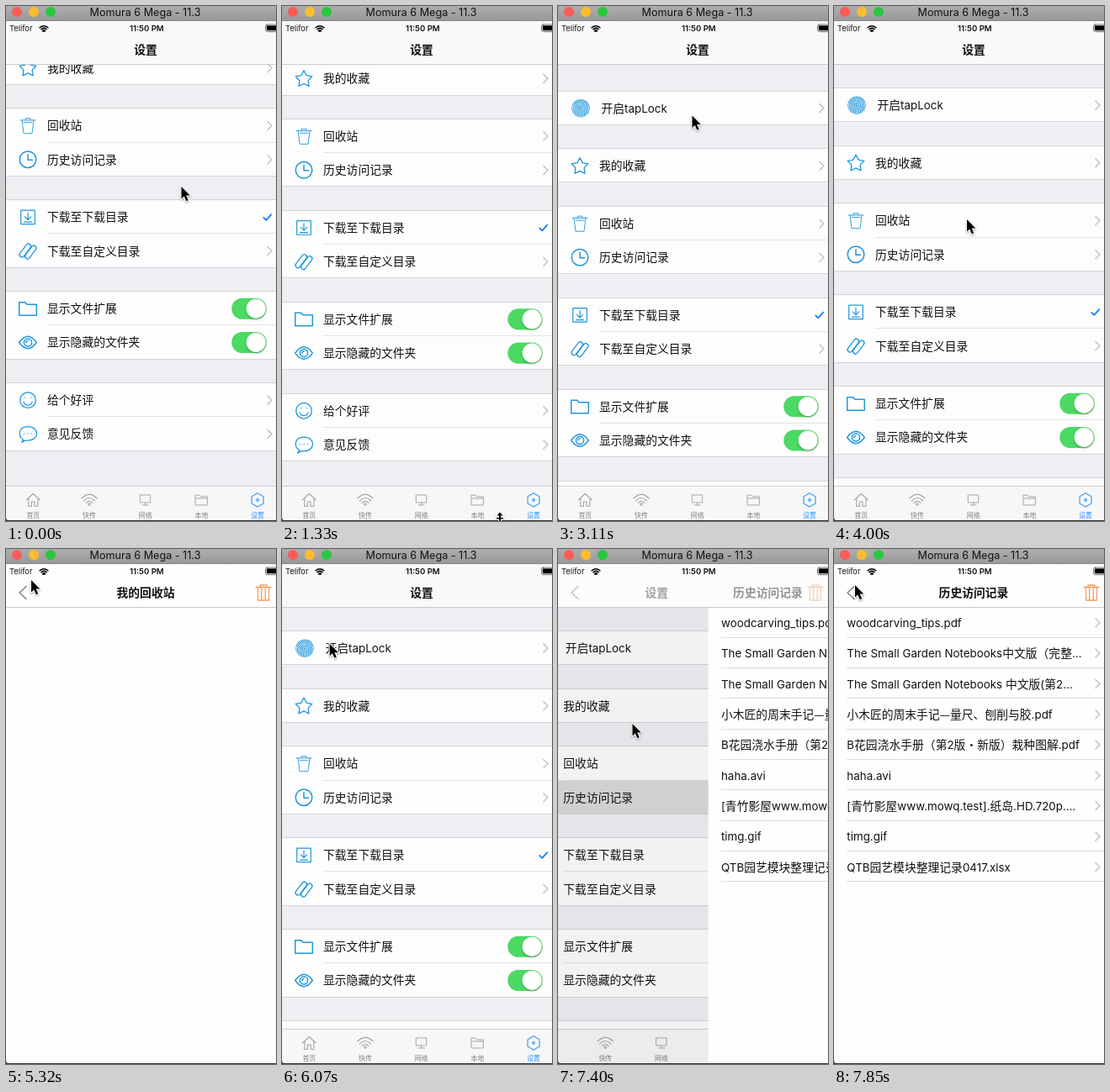
An HTML page with a canvas for the animation above (8000 ms loop, 321 by 613 pixels).

```html
<!DOCTYPE html>
<html lang="zh-CN">
<head>
<meta charset="utf-8">
<title>设置</title>
<style>
html, body { margin: 0; width: 100%; height: 100%; overflow: hidden; background: #fff; }
canvas { display: block; width: 321px; height: 613px; }
</style>
</head>
<body>
<canvas id="stage"></canvas>
<script>
const W = 321, H = 613, LOOP = 8000, STEP = LOOP / 54;
const MID = 166, NAV = 69, TAB = 572, TOP = 98, ROW = 40.25, GAP = 28.4;
const BLUE = '#1f97dc', LINE = '#e3e3e6', EDGE = '#d3d3d8';
const LATIN = 'Inter, "Liberation Sans", sans-serif';
const HAN = '"Noto Sans CJK SC", "Noto Sans CJK", sans-serif';

const canvas = document.getElementById('stage');
const ctx = canvas.getContext('2d');
const dpr = window.devicePixelRatio || 1;
canvas.width = W * dpr;
canvas.height = H * dpr;

const circle = (x, y, r) =>
  `M${x - r} ${y}a${r} ${r} 0 1 1 ${2 * r} 0a${r} ${r} 0 1 1 ${-2 * r} 0`;
const capsule = (ax, ay, bx, by, r) => {
  const len = Math.hypot(bx - ax, by - ay);
  const nx = (ay - by) / len * r, ny = (bx - ax) / len * r;
  const arc = `A${r} ${r} 0 0 0 `;
  return `M${ax + nx} ${ay + ny}L${bx + nx} ${by + ny}${arc}${bx - nx} ${by - ny}` +
    `L${ax - nx} ${ay - ny}${arc}${ax + nx} ${ay + ny}Z`;
};
const star = () => {
  let d = '';
  for (let i = 0; i < 10; i++) {
    const r = i % 2 ? 5.4 : 10.3, a = i * Math.PI / 5;
    d += (i ? 'L' : 'M') + r * Math.sin(a) + ' ' + (0.7 - r * Math.cos(a));
  }
  return d + 'Z';
};

// Each icon: path, line width
const ICONS = {
  star: [star(), 1.3],
  bin: ['M-9-6.5H9M-3-6.5V-8.7H3V-6.5M-7-6.5L-5 9.3H5L7-6.5M-5-3.8H5', 0.9],
  clock: [circle(0, 0, 9.8) + 'M0-6V.5H5.5', 1.5],
  down: ['M-8.3-8.3H8.3V8.3H-8.3ZM0-5V3M-3.7-.5L0 3.2L3.7-.5M-4.5 5.7H4.5', 1.2],
  link: [capsule(-7, 4.5, 0.5, -5.5, 2.9) + capsule(-0.5, 6.5, 7, -3.5, 2.9), 1.3],
  folder: ['M-10.3-7.6H-3.5L-1-5H10.3V8H-10.3Z', 1.5],
  eye: ['M-10.3 0Q0-14.5 10.3 0Q0 14.5-10.3 0Z' + circle(0, 0, 4.6) + 'M-2 0A2 2 0 0 1 0-2', 1.5],
  smile: [circle(0, 0, 9.3) + 'M-5 2.2A5.2 5.2 0 0 0 5 2.2M-3.4-3h.1M3.4-3h.1', 1.3],
  chat: ['M-5 7.2C-12 4-12-8.8 0-8.8C14-8.8 14 7.8 0 7.8L-2.5 7.8L-7.5 9.8Z' +
    'M-4.5-.3h.1M0-.3h.1M4.5-.3h.1', 1.3],
  home: ['M-8 0L0-7.5L8 0M-5.5-1.5V7.5H-1.8V2H1.8V7.5H5.5V-1.5', 1.1],
  waves: ['M-9.3-1.8Q0-11.5 9.3-1.8M-6.6 1Q0-6 6.6 1M-4 3.6Q0-.6 4 3.6' + circle(0, 5, 1.3), 1.1],
  screen: ['M-6-6H6V3H-6ZM-3.5 6H3.5M0 3V6', 1],
  files: ['M-7-6H-2.5L-1-4H7V6H-7ZM-7-2H7', 1],
  hex: ['M0-8.2L7-4.1V4.1L0 8.2L-7 4.1V-4.1Z' + circle(0, 0, 1.3), 1.2],
  trash: ['M-9-6.5H9M-4-6.5V-9H4V-6.5M-6.5-6.5V9H6.5V-6.5M-2.3-5V7.5M2.3-5V7.5', 1.3],
};
for (const k in ICONS) ICONS[k][0] = new Path2D(ICONS[k][0]);

const SECTIONS = [
  [['finger', '开启tapLock', 'more']],
  [['star', '我的收藏', 'more']],
  [['bin', '回收站', 'more'], ['clock', '历史访问记录', 'more']],
  [['down', '下载至下载目录', 'check'], ['link', '下载至自定义目录', 'more']],
  [['folder', '显示文件扩展', 'switch'], ['eye', '显示隐藏的文件夹', 'switch']],
  [['smile', '给个好评', 'more'], ['chat', '意见反馈', 'more']],
];
const TABS = [['home', '首页'], ['waves', '快传'], ['screen', '网络'], ['files', '本地'], ['hex', '设置']];
const FILES = [
  'woodcarving_tips.pdf',
  'The Small Garden Notebooks中文版（完整…',
  'The Small Garden Notebooks 中文版(第2…',
  '小木匠的周末手记—量尺、刨削与胶.pdf',
  'B花园浇水手册（第2版·新版）栽种图解.pdf',
  'haha.avi',
  '[青竹影屋www.mowq.test].纸岛.HD.720p.…',
  'timg.gif',
  'QTB园艺模块整理记录0417.xlsx',
];

// Key poses: [step, value...]
const SCROLL = [[1, -113], [2, -109], [3, -104], [4, -101.5], [5, -100.4], [15, -100.4], [16, -88],
  [17, -45], [18, 0], [19, 22], [20, 12], [21, 3.5], [22, 1], [23, 0]];
const POINTER = [[1, 208.5, 215], [2, 212, 250], [6, 255, 585], [8, 255, 585], [9, 259, 608],
  [10, 240, 540], [12, 211, 430], [15, 211, 430], [18, 212, 530], [19, 200, 420], [20, 178, 235],
  [21, 159.5, 130.5], [23, 159.5, 130.5], [25, 154, 190], [27, 158, 254], [31, 158, 254],
  [34, 55, 60], [35, 40, 26], [36, 30, 37], [39, 30, 38], [42, 70, 150], [45, 107, 266],
  [46, 117, 286], [49, 117, 286], [51, 60, 130], [53, 25, 43]];

function track(keys, s) {
  const j = keys.findIndex(k => k[0] >= s);
  if (j < 0) return keys[keys.length - 1].slice(1);
  if (j === 0) return keys[0].slice(1);
  const a = keys[j - 1], b = keys[j], u = (s - a[0]) / (b[0] - a[0]);
  return a.slice(1).map((v, i) => v + (b[i + 1] - v) * u);
}

// Critically damped spring, 0 to 1
function spring(ms) {
  if (ms <= 0) return 0;
  const k = ms * 0.014, p = 1 - (1 + k) * Math.exp(-k);
  return p > 0.985 ? 1 : p;
}

function rect(x, y, w, h, color) {
  ctx.fillStyle = color;
  ctx.fillRect(x, y, w, h);
}

function stroke(path, color, width) {
  ctx.strokeStyle = color;
  ctx.lineWidth = width;
  ctx.stroke(path);
}

function at(x, y, draw) {
  ctx.save();
  ctx.translate(x, y);
  draw();
  ctx.restore();
}

function icon(name, x, y, color) {
  at(x, y, () => stroke(ICONS[name][0], color, ICONS[name][1]));
}

function text(str, x, y, { size = 13.8, latin = size * 0.97, weight = 400, color = '#111', center } = {}) {
  const runs = str.match(/[\x20-\x7e…]+|[^\x20-\x7e…]+/g).map(s => {
    const font = /[\x20-\x7e…]/.test(s) ? `${weight} ${latin}px ${LATIN}` : `${weight} ${size}px ${HAN}`;
    ctx.font = font;
    return { s, font, w: ctx.measureText(s).width };
  });
  if (center) x -= runs.reduce((sum, r) => sum + r.w, 0) / 2;
  ctx.fillStyle = color;
  for (const r of runs) {
    ctx.font = r.font;
    ctx.fillText(r.s, x, y + size * 0.36);
    x += r.w;
  }
}

const chevron = new Path2D('M311-5L316 0L311 5');
const tick = new Path2D('M306.3 .5L309.3 3.5L315.3-3.2');

function finger(x, y) {
  at(x, y, () => {
    ctx.beginPath();
    ctx.arc(0, 0, 10.8, 0, 7);
    ctx.clip();
    for (let i = 0; i < 6; i++) {
      const r = 1 + i * 1.95;
      ctx.setLineDash([6 + i * 1.3, 1]);
      stroke(new Path2D(`M${-r - 1} 11Q${-r} 6 ${-r} 1A${r} ${r} 0 0 1 ${r} 1Q${r} 6 ${r - 1} 11`), BLUE, 1.15);
    }
  });
}

function toggle(y) {
  ctx.fillStyle = '#4cd964';
  ctx.beginPath();
  ctx.roundRect(268.3, y - 12.6, 41.4, 25.2, 12.6);
  ctx.fill();
  ctx.save();
  ctx.shadowColor = 'rgba(0,0,0,.25)';
  ctx.shadowBlur = 3 * dpr;
  ctx.shadowOffsetY = 1.5 * dpr;
  ctx.fillStyle = '#fff';
  ctx.beginPath();
  ctx.arc(297.2, y, 11.5, 0, 7);
  ctx.fill();
  ctx.restore();
}

function accessory(kind, y) {
  if (kind === 'switch') toggle(y);
  else at(0, y, () => kind === 'check' ? stroke(tick, '#147efb', 1.8) : stroke(chevron, '#c4c4c9', 1.5));
}

function settings(offset, picked, glow) {
  rect(0, NAV, W + 20, H - NAV, '#eeeef3');
  let y = TOP + offset;
  for (const rows of SECTIONS) {
    const h = rows.length * ROW;
    rect(0, y, W + 20, h, '#fdfdfd');
    rows.forEach(([name, label, kind], i) => {
      const top = y + i * ROW, mid = top + ROW / 2;
      if (i) rect(49, Math.round(top) - 1, W, 1, LINE);
      if (name === picked) rect(0, top, W + 20, ROW, `rgba(217,217,217,${glow})`);
      if (name === 'finger') finger(27, mid);
      else icon(name, 26, mid, BLUE);
      text(label, name === 'finger' ? 51.5 : 49, mid);
      accessory(kind, mid);
    });
    rect(0, Math.round(y) - 1, W + 20, 1, EDGE);
    rect(0, Math.round(y + h) - 1, W + 20, 1, EDGE);
    y += h + GAP;
  }
  rect(0, TAB, W + 20, H - TAB, '#f7f7f8');
  rect(0, TAB - 1, W + 20, 1, '#cfcfd3');
  TABS.forEach(([name, label], i) => {
    const x = 32.3 + i * 66.7, on = i === 4;
    icon(name, x, 588, on ? '#3d9cf5' : '#a6a6a6');
    text(label, x, 606.3, { size: 7.9, color: on ? '#2f8ff5' : '#808080', center: true });
  });
}

function page(files) {
  rect(0, NAV, W + 20, H - NAV, '#fefefe');
  files.forEach((name, i) => {
    const y = 69.3 + i * 36.35;
    text(name, 15.3, y + 18.6);
    at(0, y + 18.4, () => stroke(chevron, '#c4c4c9', 1.5));
    rect(15, Math.round(y + 36.35) - 1, W, 1, '#dcdcdf');
  });
}

function navBar(p, title) {
  rect(0, 17, W, NAV - 17, '#f9f9f9');
  rect(0, 17, W, NAV - 17, `rgba(254,254,254,${p})`);
  rect(0, NAV, W, 1, '#c9c9cc');
  const bold = { weight: 600, center: true };
  ctx.globalAlpha = Math.max(0, 1 - p * 1.4);
  text('设置', MID - p * 110, 52, bold);
  ctx.globalAlpha = p;
  if (p > 0) {
    text(title, MID + (1 - p) * 150, 52, bold);
    stroke(new Path2D('M24 44.5L16 52L24 59.5'), '#7d7d7d', 1.4);
    icon('trash', 306, 52, '#f59b5c');
  }
  ctx.globalAlpha = 1;
}

function statusBar() {
  text('Telifor', 4, 26.8, { size: 9.6, latin: 9.3 });
  at(45, 30.6, () => {
    for (const r of [2, 4.9, 7.6]) {
      ctx.beginPath();
      ctx.arc(0, 0, r === 2 ? 1.3 : r - 0.7, -2.36, -0.78);
      ctx.lineWidth = r === 2 ? 2.4 : 1.6;
      ctx.strokeStyle = '#000';
      ctx.stroke();
    }
  });
  text('11:50 PM', 167.3, 26.8, { size: 9.6, latin: 9.6, weight: 600, center: true });
  ctx.strokeStyle = '#555';
  ctx.lineWidth = 0.8;
  ctx.beginPath();
  ctx.roundRect(308.5, 22, 20, 8.6, 2);
  ctx.stroke();
  ctx.fillStyle = '#000';
  ctx.beginPath();
  ctx.roundRect(309.8, 23.3, 18, 6, 1);
  ctx.fill();
}

function windowFrame() {
  const g = ctx.createLinearGradient(0, 0, 0, 17);
  g.addColorStop(0, '#adadad');
  g.addColorStop(1, '#999');
  rect(0, 0, W, 17, g);
  rect(0, 17, W, 1, '#8b8b8b');
  ['#fc5b57', '#fdbd2f', '#29c73f'].forEach((c, i) => {
    ctx.fillStyle = c;
    ctx.beginPath();
    ctx.arc(13 + i * 20, 7, 6, 0, 7);
    ctx.fill();
  });
  text('Momura 6 Mega - 11.3', 165.5, 7.2, { size: 13.4, latin: 12.6, center: true });
  rect(0, H - 1, W, 1, '#3a3a3a');
  ctx.fillStyle = '#3a3a3a';
  ctx.fill(new Path2D('M0 609Q.5 612 4 613H0Z'));
}

const arrow = new Path2D('M0 0V14.6L3.3 11.5L5.8 17.2L8.2 16.2L5.7 10.6H10.4Z');
const resize = new Path2D('M0-5.5L3.5-1.5H1V1H4V2.6H1V6H-1V2.6H-4V1H-1V-1.5H-3.5Z');

function pointer(x, y, shape) {
  at(x, y, () => {
    ctx.save();
    ctx.shadowColor = 'rgba(0,0,0,.35)';
    ctx.shadowBlur = 2 * dpr;
    ctx.shadowOffsetY = dpr;
    stroke(shape, '#fff', 2.2);
    ctx.restore();
    ctx.fillStyle = '#000';
    ctx.fill(shape);
  });
}

function draw(now) {
  // Screen updates land slightly ahead of the even grid
  const s = Math.floor(((now % LOOP) + 15) / STEP) % 54;
  const t = s * STEP;
  const popping = t > 5600;
  const second = s >= 46;
  const p = second ? spring(t - 7300) : popping ? 1 - spring(t - 5600) : spring(t - 4490);
  const picked = second ? 'clock' : 'bin';
  const pressed = s >= 49 || (s >= 30 && !popping);
  const [offset] = track(SCROLL, s);
  const [x, y] = track(POINTER, s);

  ctx.setTransform(dpr, 0, 0, dpr, 0, 0);
  ctx.lineCap = ctx.lineJoin = 'round';
  rect(0, 0, W, H, '#fff');
  if (p < 1) at(-0.3 * W * p, 0, () => settings(offset, picked, pressed ? 1 : p));
  if (p > 0) {
    rect(0, NAV, W, H - NAV, `rgba(0,0,0,${0.1 * p})`);
    at(W * (1 - p), 0, () => page(second ? FILES : []));
  }
  navBar(p, second ? '历史访问记录' : '我的回收站');
  statusBar();
  windowFrame();
  pointer(x, y, s === 9 ? resize : arrow);
}

const start = performance.now();
function tickFrame() {
  draw(performance.now() - start);
  requestAnimationFrame(tickFrame);
}
tickFrame();
</script>
</body>
</html>
```
